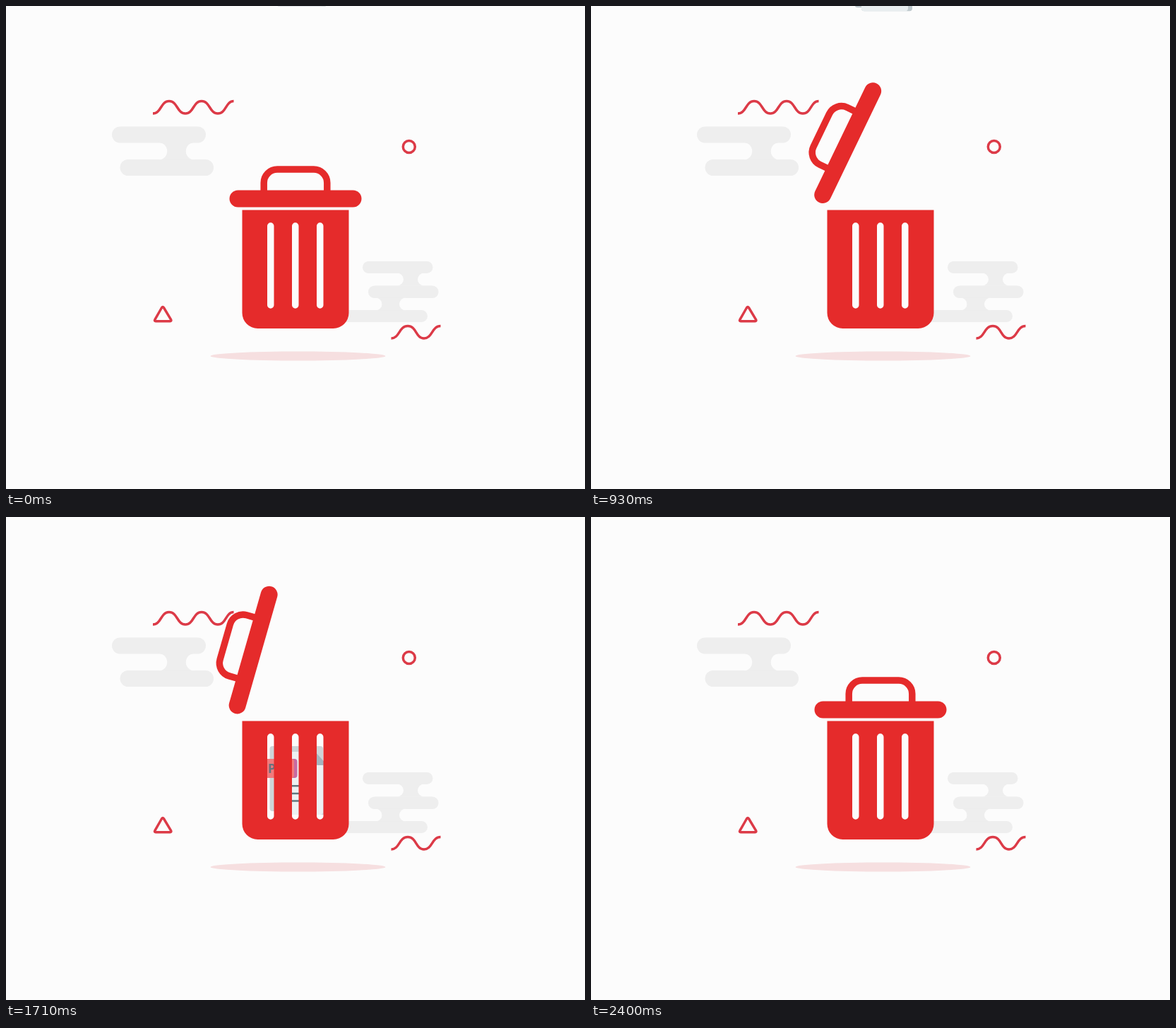
An HTML page for the animation above (2.94 s loop, 820 by 683 pixels).

```html
<!DOCTYPE html>
<html lang="en">
<head>
<meta charset="utf-8">
<title>Trash can</title>
<style>
  html, body { margin: 0; height: 100%; overflow: hidden; background: #fcfcfc; }
  svg { display: block; width: 100%; height: 100%; }
  .line { fill: none; stroke: #dc3a47; stroke-width: 3.5; stroke-linejoin: round; }
  .red { fill: #e52b2b; }
  text { font: 700 17.5px "Open Sans", "Noto Sans", sans-serif; fill: #3b4a5a; }
</style>
</head>
<body>
<svg viewBox="0 0 820 683">
  <g fill="#eee">
    <rect x="150" y="170.5" width="133" height="23" rx="11.5"/>
    <rect x="161.5" y="217" width="132.5" height="23" rx="11.5"/>
    <path d="M216 193a12 12 0 0 1 0 24.500H267a12 12 0 0 1 0-24.500z"/>
    <rect x="505" y="361" width="99.500" height="17" rx="8.5"/>
    <rect x="513" y="395.500" width="99.500" height="17.500" rx="8.750"/>
    <rect x="470" y="430" width="127" height="17" rx="8.5"/>
    <path d="M554 377.500a9 9 0 0 1 0 18H592a9 9 0 0 1 0-18z"/>
    <path d="M523.500 412.500a9 9 0 0 1 0 18H566a9 9 0 0 1 0-18z"/>
  </g>
  <g class="line">
    <path d="M208 152c12 0 11-17.500 23-17.500s11 17.500 23 17.500 11-17.500 23-17.500 11 17.500 23 17.500 11-17.500 22.500-17.500"/>
    <path d="M545.500 470c12 0 11-17.500 23.500-17.500s11 17.500 23 17.500 11-17.500 23.500-17.500"/>
    <circle cx="570.800" cy="199" r="8.500"/>
    <path d="M220.600 426.500q1.400-2 2.800 0l10.300 17.200q.8 2-1.200 2H212q-2.200 0-1.200-2z"/>
  </g>
  <ellipse cx="413.500" cy="495" rx="124" ry="6.500" fill="#f6dfe0"/>

  <g id="doc">
    <rect x="373.500" y="74" width="75.500" height="92" rx="4" fill="#c0cace"/>
    <path d="M383 86q0-4 4-4h51l17 19v66q0 4-4 4H387q-4 0-4-4z" fill="#c0cace"/>
    <path d="M383 86q0-4 4-4h51l11 13v72q0 4-4 4H387q-4 0-4-4z" fill="#e9eef0"/>
    <path d="M438 82l17 19h-13q-4 0-4-4z" fill="#8ca0ab"/>
    <rect x="390" y="92" width="22.500" height="27" rx="4" fill="#b93f86"/>
    <rect x="364.500" y="92" width="43.500" height="27" rx="4" fill="#ee5457"/>
    <text x="371" y="112">PDF</text>
    <path d="M396 130.300h27M396 141h41.500M396 151.500h41.500" stroke="#36505a" stroke-width="2.600" stroke-linecap="round"/>
  </g>

  <path class="red" fill-rule="evenodd" d="M334.500 288.500h151V434a22 22 0 0 1-22 22H356.500a22 22 0 0 1-22-22z
    M370 311a4.750 4.750 0 0 1 9.500 0v112a4.750 4.750 0 0 1-9.500 0z
    M405 311a4.750 4.750 0 0 1 9.500 0v112a4.750 4.750 0 0 1-9.500 0z
    M440 311a4.750 4.750 0 0 1 9.500 0v112a4.750 4.750 0 0 1-9.500 0z"/>

  <g id="lid">
    <rect class="red" x="316.500" y="260.500" width="187" height="24" rx="12"/>
    <path d="M365.200 264V250a19 19 0 0 1 19-19h51.600a19 19 0 0 1 19 19v14" fill="none" stroke="#e52b2b" stroke-width="9.500"/>
  </g>
</svg>
<script>
  const LOOP = 2940, STEP = 30;
  const doc = document.getElementById('doc');
  const lid = document.getElementById('lid');

  // Lid opening: [time in ms, degrees]
  const lidKeys = [
    [0, 0], [450, 27.3], [540, 33], [930, 64.2], [1080, 79.4], [1230, 100.4], [1350, 117],
    [1470, 102.2], [1620, 85], [1950, 44.6], [2160, 18.7], [2280, 6.5], [2400, 0], [LOOP, 0]
  ];

  const progress = (t, from, to) => Math.min(1, Math.max(0, (t - from) / (to - from)));

  function lidAngle(t) {
    const i = lidKeys.findIndex(key => key[0] > t);
    const [t0, a0] = lidKeys[i - 1], [t1, a1] = lidKeys[i];
    return a0 + (a1 - a0) * progress(t, t0, t1);
  }

  function draw(now) {
    const t = Math.floor(now % LOOP / STEP) * STEP;
    const fall = progress(t, 855, 1445) ** 2;
    lid.setAttribute('transform', `rotate(${-lidAngle(t)} 324 270)`);
    doc.setAttribute('transform', `translate(0 ${-170.5 + 420.5 * fall})`);
    doc.setAttribute('opacity', 1 - progress(t, 1560, 2220));
    requestAnimationFrame(draw);
  }
  draw(0);
</script>
</body>
</html>
```
